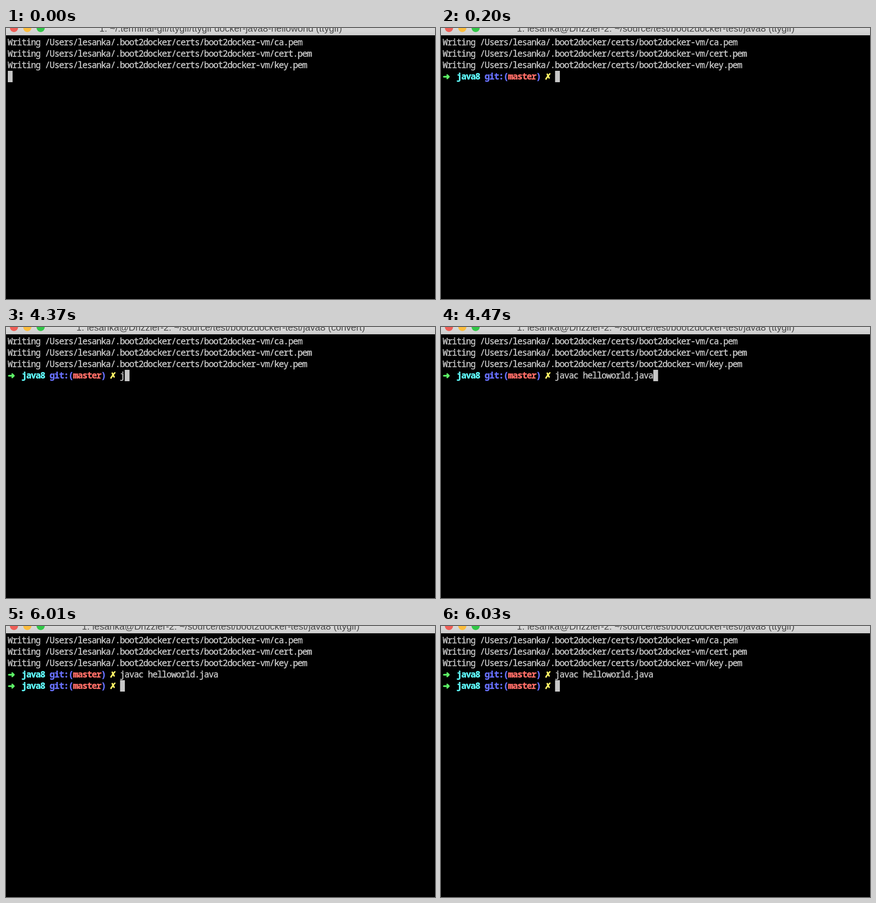
An HTML page with a canvas that plays this animation: 942 px wide and 595 px high, repeating every 8 s.

```html
<!DOCTYPE html>
<html lang="en">
<head>
<meta charset="utf-8">
<title>Terminal</title>
<style>
html, body { margin: 0; width: 100%; height: 100%; overflow: hidden; background: #000; }
canvas { display: block; width: 942px; height: 595px; }
</style>
</head>
<body>
<canvas id="stage" width="942" height="595"></canvas>
<script>
const ctx = document.getElementById('stage').getContext('2d');
const LOOP = 8000;
const LEFT = 4, TOP = 19, CELL = 10.27, ROW = 25, BASE = 19;
const MONO = '"Noto Sans Mono", "DejaVu Sans Mono", monospace';
const SYMBOL = '"DejaVu Sans", sans-serif';
const GREY = '#c7c7c7';

const USER = 'lesanka';
const CERTS = `Writing /Users/${USER}/.boot2docker/certs/boot2docker-vm/`;
const FILES = ['ca.pem', 'cert.pem', 'key.pem'];
const COMMAND = 'javac helloworld.java';
const shell = job => `1. ${USER}@Drizzler-2: ~/source/test/boot2docker-test/java8 (${job})`;

// Each step: start time, window title, typed commands (one per prompt), cursor cell
const steps = [
  { at: 0, title: '1. ~/.terminal-gif/ttygif/ttygif docker-java8-helloworld (ttygif)', prompts: [], cursor: [0, 3] },
  { at: 200, title: shell('ttygif'), prompts: [''], cursor: [24, 3] },
  { at: 220, title: shell('sh'), prompts: [''], cursor: [24, 3] },
  { at: 4370, title: shell('convert'), prompts: ['j'], cursor: [25, 3] },
  { at: 4470, title: shell('ttygif'), prompts: [COMMAND], cursor: [45, 3] },
  { at: 5050, title: '1. javac helloworld.java (ttygif)', prompts: [COMMAND], cursor: [0, 4] },
  { at: 6010, title: shell('ttygif'), prompts: [COMMAND, ''], cursor: [24, 4] }
];

// Filled text with a thin outline, for the heavy smoothing of the terminal
function ink(text, x, row, color, width) {
  const y = TOP + row * ROW + BASE;
  ctx.fillStyle = ctx.strokeStyle = color;
  ctx.lineWidth = width;
  ctx.lineJoin = 'round';
  ctx.fillText(text, x, y);
  ctx.strokeText(text, x, y);
}

function write(text, col, row, color = GREY, weight = 500) {
  ctx.font = `${weight} 19px ${MONO}`;
  ctx.letterSpacing = '0px';
  const spacing = CELL - ctx.measureText('m').width;
  ctx.letterSpacing = `${spacing}px`;
  ink(text, LEFT + col * CELL + spacing / 2, row, color, 0.5);
  ctx.letterSpacing = '0px';
}

function symbol(char, x, row, color, size) {
  ctx.font = `bold ${size}px ${SYMBOL}`;
  ink(char, x, row, color, 1.2);
}

function prompt(row, command) {
  symbol('➜', 4, row, '#5ffa68', 19);
  write('java8', 3, row, '#60fdff', 700);
  write('git:(', 9, row, '#6871ff', 700);
  write('master', 14, row, '#ff6e67', 700);
  write(')', 20, row, '#6871ff', 700);
  symbol('✗', 227.5, row, '#fff467', 18);
  write(command, 24, row);
}

function titleBar(title) {
  const shade = ctx.createLinearGradient(0, 0, 0, 16);
  shade.addColorStop(0, '#dadada');
  shade.addColorStop(1, '#cdcdcd');
  ctx.fillStyle = shade;
  ctx.fillRect(0, 0, 942, 16);
  ['#ee5f57', '#fbbd3e', '#32c748'].forEach((color, i) => {
    ctx.fillStyle = color;
    ctx.beginPath();
    ctx.arc(17.5 + i * 29.3, 0, 9, 0, Math.PI * 2);
    ctx.fill();
  });
  ctx.font = '20.6px "Liberation Sans", Arial, sans-serif';
  ctx.fillStyle = '#484848';
  ctx.textAlign = 'center';
  ctx.fillText(title, 471.5, 7.5);
  ctx.textAlign = 'left';
}

function draw(step) {
  ctx.fillStyle = '#000';
  ctx.fillRect(0, 0, 942, 595);
  titleBar(step.title);
  FILES.forEach((file, row) => write(CERTS + file, 0, row));
  step.prompts.forEach((command, i) => prompt(FILES.length + i, command));
  const [col, row] = step.cursor;
  ctx.fillStyle = GREY;
  ctx.fillRect(LEFT + col * CELL, TOP + row * ROW, 10.5, ROW);
}

const start = performance.now();
function tick() {
  const time = (performance.now() - start) % LOOP;
  draw(steps.filter(step => step.at <= time).pop());
  requestAnimationFrame(tick);
}
tick();
</script>
</body>
</html>
```
